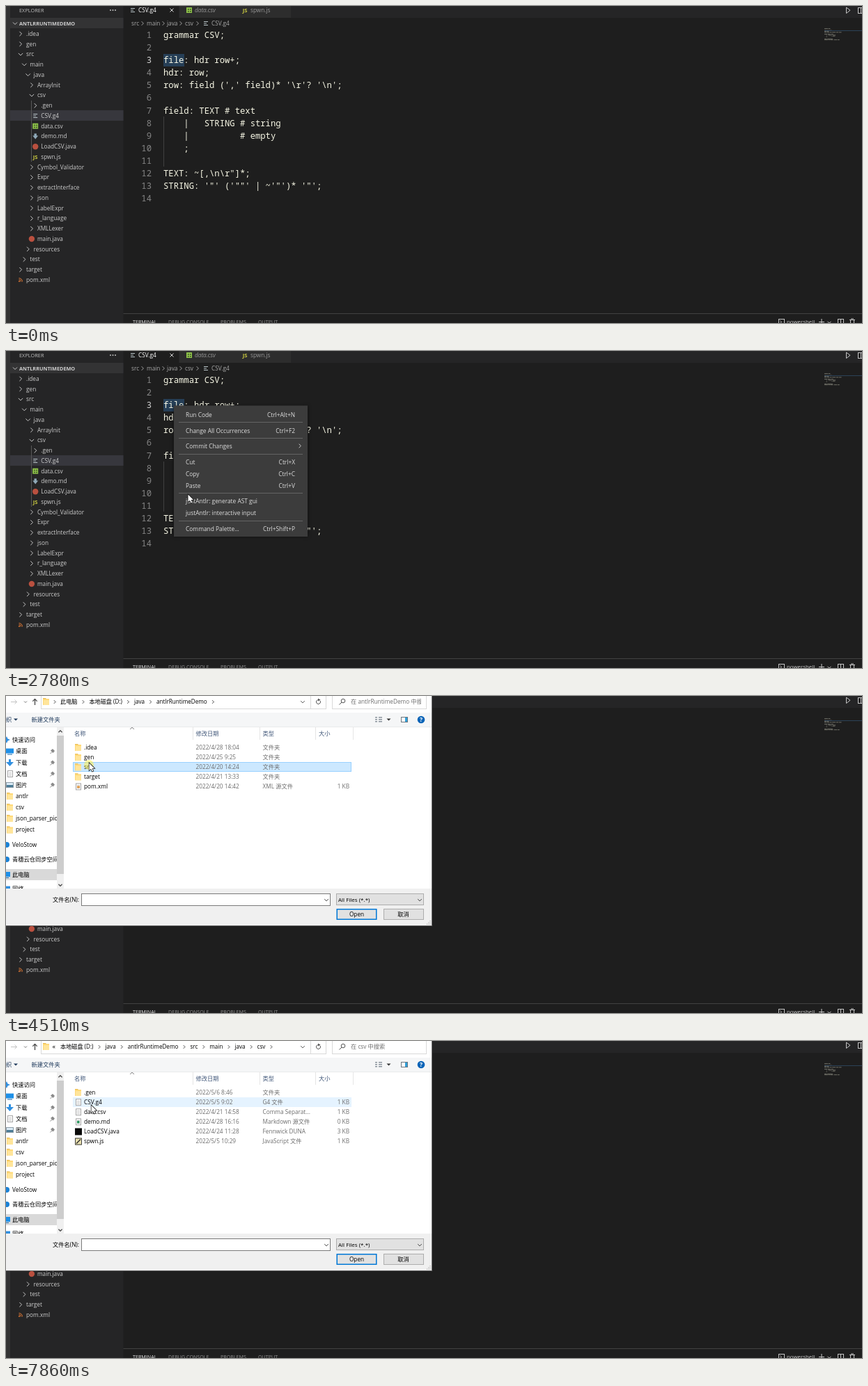
Animation of 1229 by 456 pixels, one loop 8000 ms. Source, as an HTML page with a canvas:

```html
<!DOCTYPE html>
<html lang="en">
<head>
<meta charset="utf-8">
<title>Editor and file dialog</title>
<style>
html, body { margin: 0; width: 100%; height: 100%; overflow: hidden; background: #1e1e1e; }
canvas { display: block; }
</style>
</head>
<body>
<canvas id="stage" width="1229" height="456"></canvas>
<script>
const ctx = document.getElementById('stage').getContext('2d');
const LOOP = 8000;
const UI = '"Open Sans", "Noto Sans CJK SC", "Noto Sans CJK", sans-serif';
const MONO = '"Noto Sans Mono", monospace';
const CODE_SIZE = 12.22, LINE = 18.1, ROW = 14.1, TREE_ROW = 14.75;

const GRAMMAR = [
  'grammar CSV;', '', 'file: hdr row+;', 'hdr: row;',
  "row: field (',' field)* '\\r'? '\\n';", '',
  'field: TEXT # text', '    |   STRING # string', '    |          # empty', '    ;', '',
  'TEXT: ~[,\\n\\r"]*;', "STRING: '\"' ('\"\"' | ~'\"')* '\"';", ''
];
const DATA = [
  'Details,Month,Amount', 'Mid Bonus,June,"$2,000"', ' ,January,"""zippo"""',
  'Total Bonuses,"","$5,000"', ''
];

// depth, marker, name
const TREE = [
  [0, '>', '.idea'], [0, '>', 'gen'], [0, 'v', 'src'], [1, 'v', 'main'], [2, 'v', 'java'],
  [3, '>', 'ArrayInit'], [3, 'v', 'csv'], [4, '>', '.gen'], [4, 'g4', 'CSV.g4'],
  [4, 'csv', 'data.csv'], [4, 'md', 'demo.md'], [4, 'java', 'LoadCSV.java'], [4, 'js', 'spwn.js'],
  [3, '>', 'Cymbol_Validator'], [3, '>', 'Expr'], [3, '>', 'extractInterface'], [3, '>', 'json'],
  [3, '>', 'LabelExpr'], [3, '>', 'r_language'], [3, '>', 'XMLLexer'], [3, 'java', 'main.java'],
  [2, '>', 'resources'], [1, '>', 'test'], [0, '>', 'target'], [0, 'xml', 'pom.xml']
];

const MENU = [
  [92, 'Run Code', 'Ctrl+Alt+N'], [114.5, 'Change All Occurrences', 'Ctrl+F2'],
  [137, 'Commit Changes', ''], [159.5, 'Cut', 'Ctrl+X'], [177, 'Copy', 'Ctrl+C'],
  [194, 'Paste', 'Ctrl+V'], [216, 'justAntlr: generate AST gui', ''],
  [233, 'justAntlr: interactive input', ''], [256, 'Command Palette...', 'Ctrl+Shift+P']
];

// name, date, type, size, icon
const IDE = 'Fennwick DUNA';
const FOLDERS = [
  { from: 0, chevron: 4000, name: 'antlrRuntimeDemo', rows: [
    ['.idea', '2022/4/28 18:04'], ['gen', '2022/4/25 9:25'], ['src', '2022/4/20 14:24'],
    ['target', '2022/4/21 13:33'], ['pom.xml', '2022/4/20 14:42', 'XML 源文件', '1 KB', 'xml']] },
  { from: 4710, chevron: 4910, name: 'src', rows: [
    ['main', '2022/4/20 14:24'], ['test', '2022/4/20 14:24']] },
  { from: 5520, chevron: 5800, name: 'main', rows: [
    ['java', '2022/5/5 10:29'], ['resources', '2022/4/20 14:24']] },
  { from: 6260, chevron: 6520, name: 'java', rows: [
    ['ArrayInit', '2022/4/20 15:39'], ['csv', '2022/5/6 8:46'], ['Cymbol_Validator', '2022/4/25 9:56'],
    ['Expr', '2022/4/20 15:38'], ['extractInterface', '2022/4/21 9:11'], ['json', '2022/4/24 14:32'],
    ['LabelExpr', '2022/4/20 16:50'], ['r_language', '2022/4/24 9:13'], ['XMLLexer', '2022/4/21 9:25'],
    ['main.java', '2022/4/21 9:08', IDE, '1 KB', 'java']] },
  { from: 7580, chevron: 7860, name: 'csv', rows: [
    ['.gen', '2022/5/6 8:46'], ['CSV.g4', '2022/5/5 9:02', 'G4 文件', '1 KB', 'doc'],
    ['data.csv', '2022/4/21 14:58', 'Comma Separat...', '1 KB', 'doc'],
    ['demo.md', '2022/4/28 16:16', 'Markdown 源文件', '0 KB', 'md'],
    ['LoadCSV.java', '2022/4/24 11:28', IDE, '3 KB', 'java'],
    ['spwn.js', '2022/5/5 10:29', 'JavaScript 文件', '1 KB', 'js']] }
];

// y, x, icon, label
const PLACES = [
  [63, 9, 'star', '快速访问'], [79.5, 14, 'desk', '桌面'], [96, 14, 'down', '下载'],
  [112, 14, 'doc', '文档'], [128, 14, 'pic', '图片'], [144, 14, 'dir', 'antlr'],
  [160, 14, 'dir', 'csv'], [176, 14, 'dir', 'json_parser_pic'], [192.5, 14, 'dir', 'project'],
  [214, 9, 'dot', 'VeloStow'], [235, 9, 'dot', '青穗云仓同步空间'],
  [257, 9, 'desk', '此电脑'], [277.5, 9, 'net', '网络']
];

// time, x, y of the pointer
const PATH = [
  [120, 520, 462], [700, 285, 7], [1000, 285, 7], [1270, 200, 9], [1740, 200, 9],
  [2300, 241, 79], [2660, 241, 79], [2780, 261, 206], [3040, 271, 209], [3780, 271, 209],
  [4300, 119, 96], [4910, 119, 96], [5110, 119, 77], [6790, 119, 77], [6910, 122, 92]
];
const CLICKS = [720, 1390, 4510, 5320, 6060, 7390];
const PICKS = [[4510, 4710], [5320, 5520], [6060, 6260], [7390, 7580]];

const within = (t, a, b) => t >= a && t < b;

function rect(x, y, w, h, color) {
  ctx.fillStyle = color;
  ctx.fillRect(x, y, w, h);
}
function frame(x, y, w, h, color, fill, weight = 1) {
  if (fill) rect(x, y, w, h, fill);
  ctx.strokeStyle = color;
  ctx.lineWidth = weight;
  ctx.strokeRect(x + weight / 2, y + weight / 2, w - weight, h - weight);
}
function text(s, x, y, color, { size = 8.25, align = 'left', style = '', font = UI } = {}) {
  ctx.font = `${style} ${size}px ${font}`;
  ctx.textAlign = align;
  ctx.fillStyle = color;
  ctx.fillText(s, x, y + size * 0.36);
}
function line(points, color, weight = 1) {
  ctx.beginPath();
  points.forEach(([x, y]) => ctx.lineTo(x, y));
  ctx.strokeStyle = color;
  ctx.lineWidth = weight;
  ctx.stroke();
}
function poly(points, color) {
  ctx.beginPath();
  points.forEach(([x, y]) => ctx.lineTo(x, y));
  ctx.closePath();
  ctx.fillStyle = color;
  ctx.fill();
}
function disc(x, y, r, color) {
  ctx.beginPath();
  ctx.arc(x, y, r, 0, 7);
  ctx.fillStyle = color;
  ctx.fill();
}
function chevron(x, y, dir, color, r = 3, weight = 1) {
  const h = r / 2;
  const shape = { '>': [[-h, -r], [h, 0], [-h, r]], v: [[-r, -h], [0, h], [r, -h]], '^': [[-r, h], [0, -h], [r, h]] };
  line(shape[dir].map(([a, b]) => [x + a, y + b]), color, weight);
}
function cross(x, y, color) {
  line([[x - 2.5, y - 2.5], [x + 2.5, y + 2.5]], color);
  line([[x + 2.5, y - 2.5], [x - 2.5, y + 2.5]], color);
}

function fileIcon(kind, x, y) {
  if (kind === '>' || kind === 'v') chevron(x, y, kind, '#c5c5c5', 3.2);
  if (kind === 'g4') [6, 4, 6].forEach((w, i) => rect(x - 3, y - 3 + i * 2.5, w, 1, '#b8c4c8'));
  if (kind === 'csv') {
    rect(x - 4, y - 4, 8, 8, '#8dc149');
    [-2, 1].forEach(a => [-2, 1].forEach(b => rect(x + a, y + b, 1.5, 1.5, '#2c3a20')));
  }
  if (kind === 'md') {
    rect(x - 1.7, y - 4, 3.4, 4, '#8fa9b8');
    poly([[x - 4, y - 1], [x + 4, y - 1], [x, y + 4]], '#8fa9b8');
  }
  if (kind === 'java') disc(x, y, 4.2, '#b9503f');
  if (kind === 'js') text('JS', x, y, '#cbcb41', { size: 7.6, align: 'center', style: 'bold' });
  if (kind === 'xml') {
    disc(x - 2, y + 2, 1, '#e37933');
    for (const r of [3, 5]) {
      ctx.beginPath();
      ctx.arc(x - 2.5, y + 2.5, r, -Math.PI / 2, 0);
      ctx.strokeStyle = '#e37933';
      ctx.lineWidth = 1;
      ctx.stroke();
    }
  }
}

function drawTree(selected) {
  rect(0, 0, 6, 456, '#333333');
  rect(6, 0, 162.5, 456, '#252526');
  text('EXPLORER', 19, 6, '#bbbbbb', { size: 7.4 });
  [-3.5, 0, 3.5].forEach(d => disc(153.5 + d, 6, 0.9, '#cccccc'));
  rect(6, 17, 162.5, 15, '#333334');
  chevron(13, 25, 'v', '#c5c5c5');
  text('ANTLRRUNTIMEDEMO', 19, 25, '#cfcfcf', { size: 7.3, style: 'bold' });
  TREE.forEach(([depth, kind, name], i) => {
    const y = 40 + i * TREE_ROW, x = 29 + depth * 5.3;
    if (name === selected) rect(6, Math.floor(y - 7.4), 162.5, 15, '#37373d');
    fileIcon(kind, x - 8, y);
    text(name, x, y, '#cccccc');
  });
  rect(36, 136, 1, 88, '#585858');
}

function drawTab(x, w, active, kind, name, style, hover) {
  rect(x, 0, w - 1, 17, active ? '#1e1e1e' : '#2d2d2d');
  fileIcon(kind, x + 14, 6);
  text(name, x + 22, 6, active ? '#ffffff' : '#969696', { style });
  if (active || hover) cross(x + 70, 6, active ? '#d8d8d8' : '#8a8a8a');
}

function drawMinimap(lines, mark) {
  lines.forEach((s, row) => [...s].forEach((c, i) => {
    if (c !== ' ') rect(1175 + i * 0.7, 32 + row * 1.35, 0.7, 0.9, 'rgba(225,225,205,.5)');
  }));
  rect(1175, 32 + mark * 1.35 + 0.3, 54, 1, '#2c4258');
}

function drawEditor(isData, hoverTab) {
  const lines = isData ? DATA : GRAMMAR, current = isData ? 4 : 2;
  rect(168, 0, 1061, 456, '#1e1e1e');
  rect(168, 0, 1061, 17, '#252526');
  drawTab(168, 81, !isData, 'g4', 'CSV.g4', '', hoverTab === 0);
  drawTab(249, 81, isData, 'csv', 'data.csv', 'italic', hoverTab === 1);
  drawTab(329, 81, false, 'js', 'spwn.js', '');
  line([[1206.5, 2], [1206.5, 10.5], [1212, 6.2], [1206.5, 2]], '#c5c5c5');
  frame(1223, 2, 9, 9, '#c5c5c5');
  line([[1227.5, 2], [1227.5, 11]], '#c5c5c5');

  [['src', 180], ['main', 202], ['java', 231], ['csv', 257]].forEach(([s, x]) => text(s, x, 25, '#a9a9a9'));
  [196, 226, 251, 275].forEach(x => chevron(x, 25, '>', '#a0a0a0', 2.8));
  fileIcon(isData ? 'csv' : 'g4', 287, 25);
  text(isData ? 'data.csv' : 'CSV.g4', 295, 25, '#a9a9a9');

  if (isData) {
    rect(226, 105, 944, 18, '#474747');
    rect(227, 69, 1, 18, '#404040');
  } else {
    rect(226, 69, 30, 18, '#263f57');
    rect(226, 159, 1, 72, '#404040');
  }
  lines.forEach((s, i) => {
    const y = 41.6 + i * LINE, opt = { size: CODE_SIZE, font: MONO };
    text(i + 1, 209, y, i === current ? '#d0d0d0' : '#858585', { ...opt, align: 'right' });
    text(s, 226, y, '#f8f8e6', opt);
  });
  if (isData) rect(226, 105, 1.3, 18, '#e8e8e8');
  drawMinimap(lines, current);

  rect(168, 442, 1061, 1, '#414141');
  [['TERMINAL', 182], ['DEBUG CONSOLE', 233], ['PROBLEMS', 308], ['OUTPUT', 362]].forEach(([s, x], i) =>
    text(s, x, 454.5, i ? '#969696' : '#e7e7e7', { size: 7.15 }));
  frame(1109, 450, 9, 9, '#c5c5c5');
  chevron(1112.5, 454.5, '>', '#c5c5c5', 2);
  text('powershell', 1121, 454, '#cccccc', { size: 7.9 });
  rect(1167, 454, 8, 1, '#c5c5c5');
  rect(1170.5, 450, 1, 8, '#c5c5c5');
  chevron(1182, 455, 'v', '#c5c5c5', 2.5);
  frame(1194, 450, 9, 9, '#c5c5c5');
  rect(1198, 450, 1, 9, '#c5c5c5');
  rect(1211, 451, 8, 1, '#c5c5c5');
  rect(1213, 449.5, 4, 1, '#c5c5c5');
  frame(1212, 451, 6, 9, '#c5c5c5');
}

function drawMenu(p) {
  ctx.save();
  ctx.shadowColor = 'rgba(0,0,0,.6)';
  ctx.shadowBlur = 5;
  rect(241, 78.5, 192, 188.5, '#3c3c3c');
  ctx.restore();
  [102, 125, 148, 204, 244].forEach(y => rect(248, y, 178, 1, '#646464'));
  MENU.forEach(([y, name, keys]) => {
    const hot = p.x > 243 && Math.abs(p.y - y) < 8.3;
    if (hot) rect(241, y - 8.5, 192, 17, '#094771');
    const color = hot ? '#ffffff' : '#dddddd';
    text(name, 258, y, color, { size: 8.4 });
    text(keys, 415, y, color, { size: 8.4, align: 'right' });
  });
  chevron(422, 136.5, '>', '#cccccc', 2.8);
}

function folder(x, y) {
  rect(x, y - 5, 4.5, 3, '#e8b84a');
  rect(x, y - 4, 9, 9, '#ffd978');
  rect(x + 1, y - 2, 8, 7, '#ffe59b');
}
function sheet(x, y) {
  frame(x, y - 5, 8, 10, '#a8a8a8', '#fbfbfb');
  [-2, 0, 2].forEach(d => rect(x + 2, y + d, 4, 0.7, '#bcbcbc'));
}
function rowIcon(kind, y) {
  if (!kind) return folder(99, y);
  if (kind === 'java') return rect(99, y - 5, 10, 10, '#0a0a0a');
  sheet(100, y);
  if (kind === 'md') rect(102, y - 1.5, 3.5, 3.5, '#2f9a63');
  if (kind === 'xml') rect(102, y - 1, 4, 3, '#e09a4a');
  if (kind === 'js') {
    frame(99, y - 5, 10, 10, '#404040', '#e8dfae');
    line([[101, y + 3], [107, y - 3]], '#303030', 1.5);
  }
}
// icons end just before the label and are cut by the left edge
function placeIcon(kind, y, label) {
  const right = label - 3;
  if (kind === 'star') poly([[1, y - 5], [2.5, y - 1.5], [6, y], [2.5, y + 1.5], [1, y + 5], [-2, y]], '#2f8fe0');
  if (kind === 'desk') {
    rect(right - 11, y - 4, 11, 7, '#1e90e8');
    rect(right - 9, y + 4, 7, 1, '#1767a8');
  }
  if (kind === 'down') {
    rect(4, y - 5, 3, 5, '#2f8fe0');
    poly([[0, y - 1], [11, y - 1], [5.5, y + 5]], '#2f8fe0');
  }
  if (kind === 'doc') sheet(2, y);
  if (kind === 'pic') {
    frame(0, y - 4, 11, 8, '#8a9aa5', '#dcecf6');
    rect(1, y, 9, 3, '#4b7c96');
  }
  if (kind === 'dir') folder(1, y);
  if (kind === 'dot') disc(1, y, 4, '#1a82d6');
  if (kind === 'net') rect(0, y - 4, right, 5, '#2f8fe0');
}

function drawPlaces() {
  ctx.save();
  ctx.beginPath();
  ctx.rect(0, 45, 73, 232);
  ctx.clip();
  rect(0, 249, 73, 16, '#d9d9d9');
  PLACES.forEach(([y, x, kind, name], i) => {
    placeIcon(kind, y, x);
    text(name, x, y, '#000000');
    if (within(i, 1, 5)) {
      line([[63.5, y + 3.5], [66, y + 1]], '#8a8a8a');
      poly([[64, y - 1], [67, y - 3.5], [70, y - 0.5], [67.5, y + 2.5]], '#8a8a8a');
    }
  });
  ctx.restore();
}

function drawAddress(t, level) {
  const short = t >= 6520, color = '#000000';
  const parts = ['本地磁盘 (D:)', 'java'].concat(FOLDERS.slice(0, level + 1).map(f => f.name));
  if (!short) parts.unshift('此电脑');
  rect(50, 18, 410, 1, '#d9d9d9');
  rect(437, 0, 1, 18, '#d9d9d9');
  frame(468, -2, 136, 21, '#d9d9d9');
  folder(53, 8);
  if (short) text('«', 66.5, 7.5, color, { size: 9 });
  else chevron(70, 8.5, '>', '#444444', 2.3);
  let x = 78;
  parts.forEach((s, i) => {
    text(s, x, 8.5, color, { size: 8.15 });
    x += ctx.measureText(s).width + 8.5;
    if (i < parts.length - 1 || t >= FOLDERS[level].chevron) chevron(x, 8.5, '>', '#444444', 2.3);
    x += 8.5;
  });
  chevron(426, 8.5, 'v', '#555555', 2.8);
  ctx.beginPath();
  ctx.arc(448.5, 8.5, 3, -0.6, 4.6);
  ctx.strokeStyle = '#555555';
  ctx.stroke();
  poly([[448, 3.5], [451.5, 5.5], [448, 7.5]], '#555555');
  ctx.beginPath();
  ctx.arc(484, 7, 2.8, 0, 7);
  ctx.stroke();
  line([[482, 9], [478.5, 12.5]], '#555555');
  ctx.save();
  ctx.beginPath();
  ctx.rect(490, 0, 106, 18);
  ctx.clip();
  text(`在 ${FOLDERS[level].name} 中搜索`, 495, 8.5, '#6d6d6d');
  ctx.restore();

  text('织', 0, 34, '#1e395b');
  poly([[11, 32.5], [17, 32.5], [14, 35.5]], '#1e395b');
  text('新建文件夹', 36.5, 34, '#1e395b');
  [30, 33, 36].forEach(y => {
    rect(530, y, 3, 1.5, '#8a939c');
    rect(535, y, 5, 1.5, '#8a939c');
  });
  poly([[546.5, 32.5], [552.5, 32.5], [549.5, 35.5]], '#333333');
}

function drawList(t, level, p) {
  const { rows } = FOLDERS[level];
  const at = Math.floor((p.y - 67) / ROW);
  const picked = PICKS.some(([a, b]) => within(t, a, b));
  rows.forEach(([name, date, type = '文件夹', size = '', icon], i) => {
    const y = 74 + i * ROW, top = Math.round(y - 7);
    if (i === at && within(p.x, 96, 496)) {
      if (picked) frame(96, top, 400, 14, '#99d1ff', '#cce8ff');
      else rect(96, top, 400, 14, '#e5f3ff');
    }
    rowIcon(icon, y);
    text(name, 112, y, '#000000');
    text(date, 272.5, y, '#6d6d6d');
    text(type, 368.5, y, '#6d6d6d');
    text(size, 493, y, '#6d6d6d', { align: 'right' });
  });
}

function drawDialog(t, p) {
  const level = FOLDERS.filter(f => t >= f.from).length - 1;
  const ready = t >= 3570, focus = t < 4510;
  rect(0, 0, 612, 331, '#6a6a6a');
  rect(0, 0, 611, 330, '#ffffff');
  rect(0, 24, 611, 20, '#f5f6f7');
  rect(0, 44, 611, 1, '#e9eaeb');
  line([[7, 8.5], [15, 8.5]], '#c4c4c4');
  chevron(14, 8.5, '>', '#c4c4c4', 3);
  chevron(28, 8.5, 'v', ready ? '#777777' : '#bbbbbb', 2);
  line([[41.5, 13], [41.5, 5]], '#444444', 1.3);
  chevron(41.5, 6, '^', '#444444', 3.2, 1.3);
  rect(50, 0, 1, 18, '#d9d9d9');
  rect(459, 0, 1, 18, '#d9d9d9');
  if (ready) drawAddress(t, level);
  frame(567, 30, 10, 8, '#6b7680', '#ffffff');
  rect(573, 31, 3, 6, '#2f9fd8');
  disc(596, 34, 5.3, '#0a64b8');
  text('?', 596, 34, '#ffffff', { size: 8.5, align: 'center', style: 'bold' });

  ctx.save();
  if (!ready) ctx.translate(0, -1);
  rect(73, 45, 10, 232, '#f0f0f0');
  rect(73, 57, 10, 199, '#cdcdcd');
  chevron(78, 51, '^', '#505050', 2.6, 1.3);
  chevron(78, 272, 'v', '#505050', 2.6, 1.3);
  drawPlaces();
  [['名称', 98], ['修改日期', 272.5], ['类型', 368.5], ['大小', 449]].forEach(([s, x]) => text(s, x, 54.5, '#42587a'));
  [268, 364, 444, 498].forEach(x => rect(x, 45, 1, 18, '#e5e5e5'));
  chevron(181, 46.5, '^', '#777777', 2.8);
  drawList(t, level, p);
  ctx.restore();

  rect(0, 277, 611, 53, '#f0f0f0');
  text('文件名(N):', 105, 293, '#000000', { align: 'right' });
  frame(108, 284, 358, 18, focus ? '#0078d7' : '#7a7a7a', '#ffffff');
  if (focus && t < 4040) rect(110, 287, 1, 12, '#000000');
  chevron(460, 293.5, 'v', '#444444', 2.8);
  frame(474, 284, 126, 17, '#adadad', '#e1e1e1');
  text('All Files (*.*)', 477, 293, '#000000', { size: 8 });
  chevron(594, 293.5, 'v', '#444444', 2.8);
  frame(474.5, 306, 58, 16, '#0078d7', '#e1e1e1', 1.5);
  text('Open', 503.5, 314, '#000000', { align: 'center' });
  frame(542, 306, 58, 16, '#adadad', '#e1e1e1');
  text('取消', 570.5, 314, '#000000', { align: 'center' });
  for (let i = 0; i < 3; i++)
    for (let j = 0; j <= i; j++) rect(608.5 - j * 2.3, 323 + i * 2.3, 1.2, 1.2, '#b5b5b5');
}

function pointer(t) {
  const i = PATH.findIndex(k => k[0] > t);
  if (i < 0) return { x: PATH.at(-1)[1], y: PATH.at(-1)[2] };
  if (i === 0) return { x: -50, y: -50 };
  const [t0, x0, y0] = PATH[i - 1], [t1, x1, y1] = PATH[i];
  const u = (t - t0) / (t1 - t0), e = u * u * (3 - 2 * u);
  return { x: x0 + (x1 - x0) * e, y: y0 + (y1 - y0) * e };
}

function outlined(points, x, y, weight) {
  const moved = points.map(([a, b]) => [x + a, y + b]);
  line([...moved, moved[0], moved[1]], '#111111', weight);
  poly(moved, '#ffffff');
}
function drawPointer(t, { x, y }) {
  if (CLICKS.some(c => within(t, c, c + 140))) disc(x, y + 3, 7, 'rgba(255,240,60,.5)');
  if (t < 2330 && y < 17) {
    outlined([[-1, 0], [1, 0], [1, 4.5], [5.5, 6], [5.5, 9.5], [4, 13], [-1.5, 13], [-4.5, 8.5], [-3.5, 7.2], [-1, 9]], x, y, 1.5);
  } else if (t < 2330 && y < 442) {
    rect(x - 0.5, y - 5, 1, 11, '#e0e0e0');
    rect(x - 2.5, y - 5.5, 5, 1, '#e0e0e0');
    rect(x - 2.5, y + 5.5, 5, 1, '#e0e0e0');
  } else {
    outlined([[0.5, 0.5], [0.5, 11], [3, 8.8], [4.7, 12.6], [6.3, 11.9], [4.7, 8.2], [8, 8]], x, y, 1.4);
  }
}

function draw(t) {
  const p = pointer(t);
  const isData = within(t, 720, 1400);
  const hoverTab = p.y > 0 && p.y < 17 ? (p.x < 249 ? 0 : 1) : -1;
  ctx.clearRect(0, 0, 1229, 456);
  drawEditor(isData, hoverTab);
  drawTree(within(t, 860, 1470) ? 'data.csv' : 'CSV.g4');
  if (within(t, 2330, 3310)) drawMenu(p);
  if (t >= 3380) {
    ctx.globalAlpha = Math.min(1, 0.35 + (t - 3380) / 150);
    drawDialog(t, p);
    ctx.globalAlpha = 1;
  }
  drawPointer(t, p);
}

function tick() {
  draw(performance.now() % LOOP);
  requestAnimationFrame(tick);
}
tick();
</script>
</body>
</html>
```
